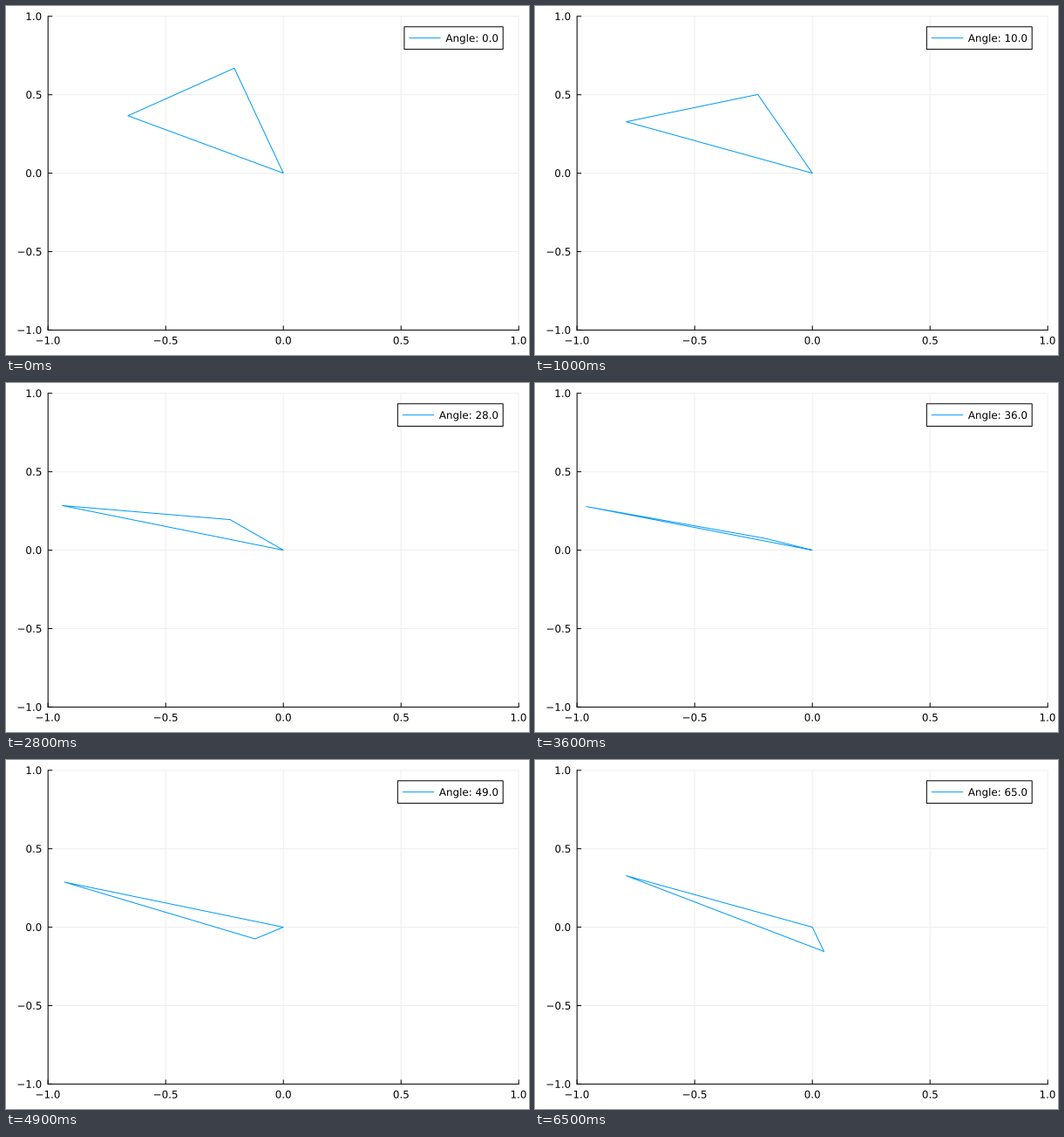
A matplotlib script that plays this animation: 600x400 px, repeating every 6.6 s.

```python
import numpy as np
import matplotlib.pyplot as plt
from matplotlib.animation import FuncAnimation
from matplotlib.patches import PathPatch, Rectangle
from matplotlib.textpath import TextPath
from matplotlib.transforms import Affine2D

W, H, DPI = 600, 400, 100
PX = 72 / DPI  # one pixel in points
BLUE = "#009af9"
LEFT, RIGHT, TOP, BOTTOM = 48.2, 588.2, 11.8, 371.4
KEY_RIGHT, KEY_TOP, KEY_BOTTOM = 570.2, 23.8, 49.6
FONT_SIZE = 11.9
HALF_CAP = 0.365 * FONT_SIZE
FRAMES, STEP = 66, 100

plt.rcParams["font.family"] = "DejaVu Sans"

fig = plt.figure(figsize=(W / DPI, H / DPI), dpi=DPI, facecolor="white")
ax = fig.add_axes([0, 0, 1, 1])
ax.set(xlim=(0, W), ylim=(H, 0))
ax.axis("off")


def px(x):
    return LEFT + (x + 1) / 2 * (RIGHT - LEFT)


def py(y):
    return BOTTOM - (y + 1) / 2 * (BOTTOM - TOP)


def line(xs, ys, color="black", z=2):
    return ax.plot(xs, ys, color=color, lw=PX, zorder=z, snap=False,
                   solid_capstyle="butt")[0]


def text_path(s, x, y, align):
    """Outline of s, centred on y; align is 0.5 for centre, 1 for right."""
    path = TextPath((0, 0), s, size=FONT_SIZE)
    ext = path.get_extents()
    shift = x - ext.x0 - align * ext.width
    return Affine2D().scale(1, -1).translate(shift, y + HALF_CAP).transform_path(path)


def text(s, x, y, align):
    patch = PathPatch(text_path(s, x, y, align), fc="black", lw=0, zorder=5)
    return ax.add_patch(patch)


for v in np.linspace(-1, 1, 5):
    x, y = px(v), py(v)
    name = f"{v:.1f}".replace("-", "\u2212")
    line([x, x], [TOP, BOTTOM], "#efefef", 1)
    line([LEFT, RIGHT], [y, y], "#efefef", 1)
    line([x, x], [BOTTOM, BOTTOM - 5])
    line([LEFT, LEFT + 5], [y, y])
    text(name, x, 383.2, 0.5)
    text(name, 40.4, y, 1)
line([LEFT, LEFT], [TOP - 0.5, BOTTOM + 0.5])
line([LEFT - 0.5, RIGHT + 0.5], [BOTTOM, BOTTOM])


def near(angle):
    t = angle / 65
    x = -0.2085 - 0.203 * t + 0.311 * t**2 + 0.150 * t**3
    y = 0.432 - 0.588 * np.sin(np.radians(1.7 * (angle - 14)))
    return x, y


def far(angle):
    swing = np.cos(np.radians(1.75 * (angle - 37.5)))
    return -0.449 - 0.512 * swing, 0.428 - 0.150 * swing


triangle = line([], [], BLUE, 3)
key_y = (KEY_TOP + KEY_BOTTOM) / 2
box = Rectangle((0, KEY_TOP), 1, KEY_BOTTOM - KEY_TOP, fc="white", ec="black",
                lw=PX, zorder=4, snap=False)
ax.add_patch(box)
sample = line([], [], BLUE, 5)
label = text("Angle: 0.0", KEY_RIGHT - 6, key_y, 1)


def draw(angle):
    xs, ys = np.transpose([(0, 0), near(angle), far(angle), (0, 0)])
    triangle.set_data(px(xs), py(ys))

    path = text_path(f"Angle: {angle:.1f}", KEY_RIGHT - 6, key_y, 1)
    label.set_path(path)
    left = path.get_extents().x0 - 47.6
    box.set_x(left)
    box.set_width(KEY_RIGHT - left)
    sample.set_data([left + 5.4, left + 41.8], [key_y, key_y])
    return triangle, box, sample, label


anim = FuncAnimation(fig, draw, frames=FRAMES, interval=STEP,
                     repeat=True, repeat_delay=0)
plt.show()
```
